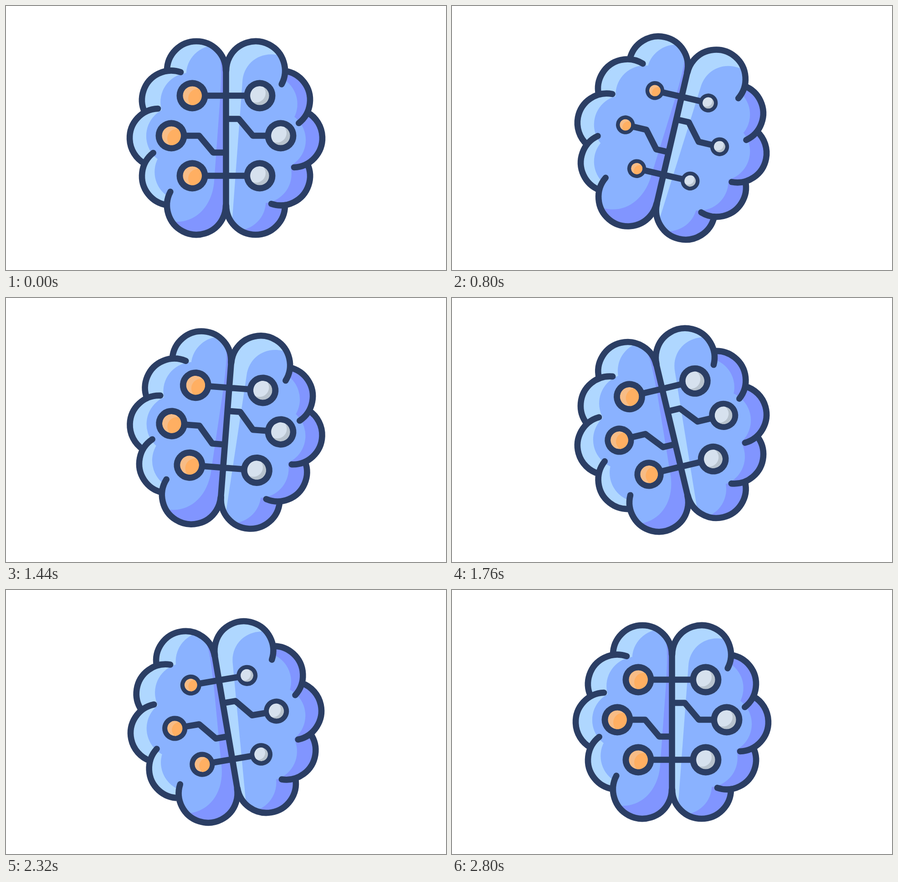
Recreate the animation shown at these times as an HTML page with a canvas. Size 966 by 580 pixels, loop 2.96 s.

```html
<!DOCTYPE html>
<html lang="en">
<head>
<meta charset="utf-8">
<title>Brain circuit</title>
<style>
  html, body { margin: 0; width: 100%; height: 100%; overflow: hidden; background: #fff; }
  canvas { display: block; }
</style>
</head>
<body>
<canvas id="stage" width="966" height="580"></canvas>
<script>
const ctx = document.getElementById('stage').getContext('2d');
const LOOP = 2960, STEP = 80, LINE = 13.6;
const INK = '#2b3e64', MID = '#8ab2ff', LIGHT = '#afd7ff', DARK = '#8195ff';
const RAD = Math.PI / 180;

// Coordinates are relative to the middle of the brain; the right half
// is the left one turned by 180 degrees.
const LOBE_R = 64.5, HOOK = 27 * RAD;
const lobes = [-2, -1, 0, 1, 2].map(i => ({
  x: [-147, -120, -65][Math.abs(i)],
  y: Math.sign(i) * [0, 83.5, 148][Math.abs(i)]
}));

// Angle at which the outer edges of two neighbouring lobes meet.
function meeting(from, to, turn) {
  const dx = to.x - from.x, dy = to.y - from.y;
  return Math.atan2(dy, dx) + turn * Math.acos(Math.hypot(dx, dy) / 2 / LOBE_R);
}

function disc(path, x, y, r) {
  path.moveTo(x + r, y);
  path.arc(x, y, r, 0, 2 * Math.PI);
}

// Lobes with the area between them and the spine, all wound clockwise.
function blob(centres) {
  const path = new Path2D();
  path.moveTo(0, -148);
  path.lineTo(0, 148);
  [...centres].reverse().forEach(c => path.lineTo(c.x, c.y));
  path.closePath();
  centres.forEach(c => disc(path, c.x, c.y, LOBE_R));
  return path;
}

const silhouette = blob(lobes);
const core = blob(lobes.map((c, i) => ({
  x: c.x + 42 * Math.sqrt(1 - (i / 4) ** 2),
  y: c.y + 9 * Math.cos(60 * i * RAD)
})));

const outline = new Path2D();
lobes.forEach((c, i) => {
  const from = i > 0 ? meeting(c, lobes[i - 1], -1) + HOOK : 0;
  const to = i < 4 ? meeting(c, lobes[i + 1], 1) : 0;
  outline.moveTo(c.x + LOBE_R * Math.cos(from), c.y + LOBE_R * Math.sin(from));
  outline.arc(c.x, c.y, LOBE_R, from, to, true);
});

const halves = [
  { base: LIGHT, edge: DARK, strip: new Path2D('M-114 184C-65 187-30 148-26 95L-13-85C-9-155-11-170-15-183H10V220H-114Z') },
  { base: DARK, edge: LIGHT, strip: new Path2D('M-110 183C-72 189-38 163-36 123L-14-175H10V230H-110Z') }
];

const NODE_R = 34.5, HOLE_R = 20.8;
const nodes = [];
const wires = new Path2D('M0-148V148');
for (const side of [-1, 1]) {
  for (const row of [-1, 0, 1]) {
    const x = side * (120 - 46 * Math.abs(row)), y = 88 * row - 5;
    const delay = row < 0 ? 85 : row * (25 + 25 * side);
    nodes.push({ x, y, side, delay });
    wires.moveTo(x - side * (NODE_R - 3), y);
    if (row === 0) {
      wires.lineTo(side * 59, y);
      wires.lineTo(side * 28, y - side * 37);
      wires.lineTo(0, y - side * 37);
    } else {
      wires.lineTo(0, y);
    }
  }
}

function fill(color, path) {
  ctx.fillStyle = color;
  ctx.fill(path);
}

const clamp = v => Math.min(1, Math.max(0, v));
const smooth = u => u * u * (3 - 2 * u);

// Symmetric cubic-bezier(.6, 0, .4, 1), solved by bisection.
function swing(x) {
  let lo = 0, hi = 1;
  for (let i = 0; i < 24; i++) {
    const u = (lo + hi) / 2, v = 1 - u;
    if (1.8 * u * v * v + 1.2 * u * u * v + u * u * u < x) lo = u; else hi = u;
  }
  return smooth((lo + hi) / 2);
}

function angleAt(t) {
  const part = (from, to) => swing(clamp((t - from) / (to - from)));
  return (15 * part(240, 1040) - 30 * part(1040, 1950) + 15 * part(1965, 2770)) * RAD;
}

function nodeScale(t) {
  const dip = start => smooth(clamp((t - start) / 360)) - smooth(clamp((t - start - 475) / 360));
  return 1 - 0.4 * (dip(345) + dip(1665));
}

function drawHalf({ base, edge, strip }) {
  ctx.save();
  ctx.clip(silhouette);
  fill(base, silhouette);
  fill(MID, core);
  fill(edge, strip);
  ctx.restore();
  ctx.stroke(outline);
}

// A node shrinks towards the end of its wire.
function drawNode({ x, y, side, delay }, t) {
  const s = nodeScale(t - delay);
  const circle = (dx, dy, r) => {
    const path = new Path2D();
    disc(path, dx, dy, r);
    return path;
  };
  ctx.save();
  ctx.translate(x - side * NODE_R, y);
  ctx.scale(s, s);
  ctx.translate(side * NODE_R, 0);
  fill(INK, circle(0, 0, NODE_R));
  const hole = circle(0, 0, HOLE_R);
  ctx.clip(hole);
  fill(side < 0 ? '#f7bc86' : '#b8c3ce', hole);
  fill(side < 0 ? '#ffaf62' : '#d6e1ee', side < 0 ? circle(12, 6, 21) : circle(-8, -6, 21));
  ctx.restore();
}

function draw(t) {
  ctx.setTransform(1, 0, 0, 1, 0, 0);
  ctx.fillStyle = '#fff';
  ctx.fillRect(0, 0, 966, 580);
  ctx.translate(483, 290);
  ctx.rotate(angleAt(t));

  ctx.strokeStyle = INK;
  ctx.lineWidth = LINE;
  ctx.lineCap = ctx.lineJoin = 'round';
  for (const half of halves) {
    drawHalf(half);
    ctx.rotate(Math.PI);
  }
  ctx.lineCap = 'butt';
  ctx.stroke(wires);
  nodes.forEach(n => drawNode(n, t));
}

const start = performance.now();
function tick() {
  const t = (performance.now() - start) % LOOP;
  draw(Math.floor(t / STEP) * STEP);
  requestAnimationFrame(tick);
}
tick();
</script>
</body>
</html>
```
